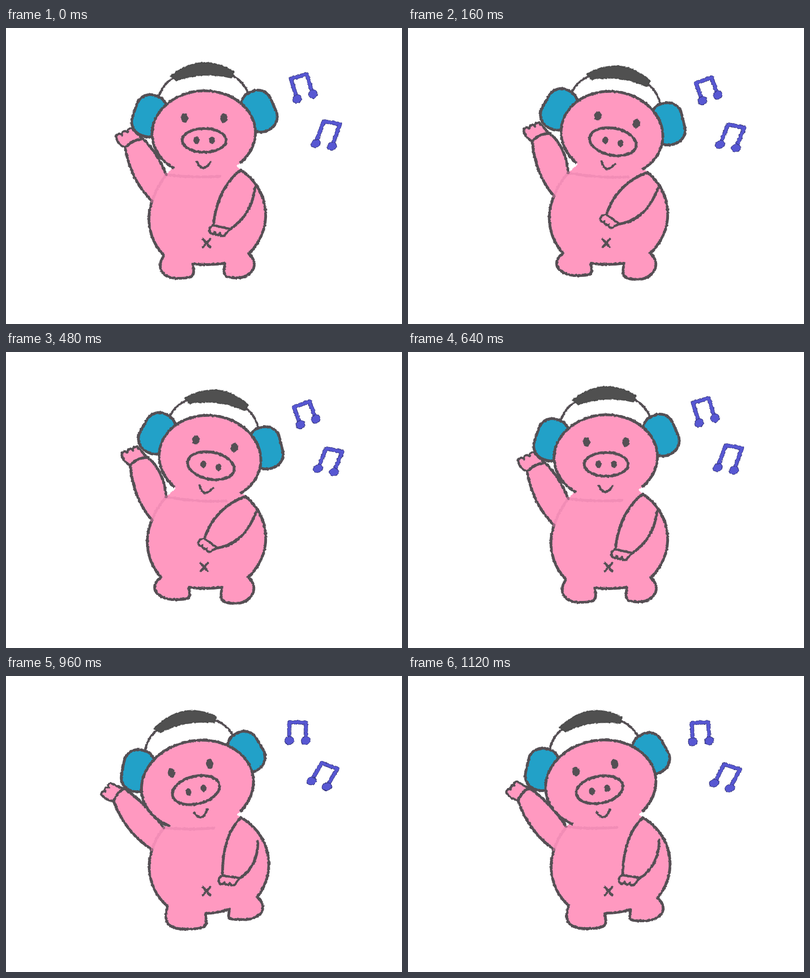
These frames come from a looping animation (865 by 648 pixels, 1.36 s). An HTML page:

```html
<!DOCTYPE html>
<html lang="en">
<head>
<meta charset="utf-8">
<title>Dancing pig</title>
<style>
  html, body { margin: 0; width: 100%; height: 100%; overflow: hidden; background: #fff; }
  svg { display: block; width: 100%; height: 100%; }
  path, ellipse, rect { stroke: #554f54; stroke-width: 6; stroke-linejoin: round; stroke-linecap: round; fill: none; }
  .skin { fill: #ff99c0; }
  .bare { stroke: none; }
  .ear { fill: #22a1c8; }
  .pad { fill: #505050; stroke: #484848; stroke-width: 2; }
  .dot { fill: #554f54; stroke: none; }
  .head { stroke-linecap: butt; stroke-dasharray: 275 85; stroke-dashoffset: -130; }
  .shade { stroke: #e582ad; opacity: .5; }
  .thin { stroke-width: 5; }
  .edge { stroke: #34347c; stroke-width: 9; }
  .note { stroke: #5757d2; stroke-width: 7; }
  .bulb { fill: #5757d2; stroke: #34347c; stroke-width: 1.2; }
</style>
</head>
<body>
<svg id="stage" viewBox="0 0 865 648">
  <filter id="crayon" filterUnits="userSpaceOnUse" x="0" y="0" width="865" height="648" color-interpolation-filters="sRGB">
    <feTurbulence type="fractalNoise" baseFrequency=".2" numOctaves="2" seed="4"/>
    <feDisplacementMap in="SourceGraphic" scale="4" xChannelSelector="R" yChannelSelector="G"/>
  </filter>
</svg>
<script>
const line = (d, style = '') => `<path class="${style}" d="${d}"/>`;
const oval = (x, y, rx, ry, style = '', tilt = 0) =>
  `<ellipse class="${style}" cx="${x}" cy="${y}" rx="${rx}" ry="${ry}" transform="rotate(${tilt} ${x} ${y})" pathLength="360"/>`;
const place = (x, y, tilt, content, skew = 0) =>
  `<g transform="translate(${x} ${y}) rotate(${tilt}) skewX(${skew})">${content}</g>`;

// Curve from a to b, pulled away from the straight line by (dx, dy).
const bend = (a, b, dx, dy) => `Q${(a[0] + b[0]) / 2 + dx},${(a[1] + b[1]) / 2 + dy} ${b}`;

function foot(a, b, sole, bulgeA, bulgeB) {
  const mid = (a[0] + b[0]) / 2, wide = (a[0] - mid) * 1.3;
  return `C${a[0] + bulgeA},${a[1] + 22} ${mid + wide},${sole} ${mid},${sole}` +
    `C${mid - wide},${sole} ${b[0] + bulgeB},${b[1] + 22} ${b}`;
}

// Three round fingers on a cuff from a to b; slant slides the fingertips along the cuff.
function paw(a, b, reach, slant) {
  const [dx, dy] = [b[0] - a[0], b[1] - a[1]], width = Math.hypot(dx, dy);
  const at = (s, out) => [a[0] + dx * s - dy / width * out, a[1] + dy * s + dx / width * out];
  const size = width * .16;
  let d = `M${a}Q${at(slant - .1, reach * .4)} ${at(slant, reach)}`;
  for (let i = 1; i <= 3; i++) d += `A${size} ${size} 0 0 0 ${at(slant + i * .31, reach)}`;
  return line(d + `Q${at(slant + 1, reach * .5)} ${b}Z`, 'skin thin');
}

function note(x, y, tilt, height, skew) {
  const stems = `M-18 0V${-height}H18V0`;
  const bulbs = [-18, 18].map(side => oval(side, 0, 10, 9, 'bulb', -20)).join('');
  return place(x, y, tilt, line(stems, 'edge') + line(stems, 'note') + bulbs, skew);
}

function headphones() {
  const ear = side => place(side * 120, 0, side * -21,
    '<rect class="ear" x="-34" y="-46" width="68" height="92" rx="31"/>');
  const wire = side => line(`M${side * 98}-40Q${side * 88}-68 ${side * 62}-82`, 'thin');
  return [-1, 1].map(side => wire(side) + ear(side)).join('') +
    line('M-70-85Q0-136 69-88L63-75Q0-93-58-74Z', 'pad');
}

function face(swing) {
  const pair = (x, y, rx, ry) => oval(-x, y, rx, ry, 'dot') + oval(x, y, rx, ry, 'dot');
  return pair(43, -49, 8, 10.5) + pair(17, 0, 6.5, 8) +
    oval(0, 0, 48 + 3.5 * swing, 26 + 3.5 * swing) + line('M-16 47Q-3 74 14 47', 'thin');
}

// The whole pose follows from one number: negative leans left, positive leans right.
function pig(lean) {
  const right = Math.max(lean, 0), left = Math.max(-lean, 0), swing = Math.abs(lean);
  const turn = Math.min(lean, 1);
  const at = (rest, perRight, perLeft) => rest + perRight * right + perLeft * left;

  const shoulder = [at(513, 10, 0), at(311, 5, -1)];
  const hip = [at(530, -1, 15), at(494, -1, -8)];
  const crotchR = [at(478, -6.5, 8), at(515, 0, -4)];
  const crotchL = [at(408, -8.5, 22), at(516, -1, 3)];
  const ankle = [at(345, -6.5, 6), at(498, -5, 5)];
  const armpit = [319, at(379, -11, 1)];
  const wristOut = [at(260, 11, -20), at(262, -14, 10)];
  const wristIn = [at(300, 10, -33), at(243, -12, 3)];
  const neck = [at(350, 0, -4), at(321, -4, 9)];
  const cuffA = [at(453, -20, 16), at(432, -23.5, 4)];
  const cuffB = [at(490, -28, 17), at(440, -11, 2)];
  const elbow = [at(544, 2, 5), at(349, 2, 10)];
  const head = [at(432, 13.5, -11), at(230.5, 1.5, 7)];
  const gearTilt = at(-2.4, 0, -6) + 10 * Math.max(turn, 0);

  const body = `M${shoulder}A122 118 0 0 1 ${hip}` + foot(hip, crotchR, at(547, 3.5, -11), 26, -2) +
    bend(crotchR, crotchL, 0, 5) + foot(crotchL, ankle, at(548, -6, 5), 2, at(-16, -13, 9)) +
    `A122 118 0 0 1 ${armpit}` + bend(armpit, wristOut, -16, 15) +
    bend(wristOut, wristIn, -3, -9) + bend(wristIn, neck, at(6, 8, 0), at(-8, -8, 0));
  const arm = `M${shoulder}${bend(shoulder, cuffA, -21, -22)}` +
    `M${cuffB}${bend(cuffB, elbow, at(20, -4, 0), at(14, 16, 0))}`;
  const chin = `M${neck}Q${head[0] - 25},${head[1] + 98} ${head[0] + 35},${head[1] + 94}` +
    `M${neck}${bend(neck, armpit, -5, -3)}`;
  const navel = `translate(${at(438, -5, 0)} 471)`;

  return place(at(433, 16, -21), at(187, 7, 0), gearTilt, headphones()) +
    paw(wristIn, wristOut, 28, .25) +
    line(`${body}L${head}Z`, 'skin bare') + line(body) +
    oval(...head, at(113, -1.5, 8), at(93, 0, 4), 'skin head', gearTilt) + line(chin, 'shade') +
    place(433 + 14.5 * lean, 246 + 3 * swing, 11 * turn, face(swing)) +
    line(arm) + paw(cuffA, cuffB, 14, -.15) +
    `<g transform="${navel}">${line('M-8-9L8 9M8-9L-8 9', 'thin')}</g>` +
    note(at(653, 7, -13), at(150, 3, -7), at(-17, -3, 14), 46 - 5 * swing, 0) +
    note(at(694, 5, -8), at(256, 3, -16), at(10, 2, 8), at(51, -4, -5), -10);
}

const stage = document.getElementById('stage');
const poses = [0, 1, 2, 1, 0, -1, -1.25, -1].map(lean => {
  const group = document.createElementNS('http://www.w3.org/2000/svg', 'g');
  group.setAttribute('filter', 'url(#crayon)');
  group.innerHTML = pig(lean);
  stage.append(group);
  return group;
});
const beat = 160, loop = 1360;

function show(time) {
  const step = Math.min(Math.floor(time % loop / beat), poses.length - 1);
  poses.forEach((pose, i) => pose.style.display = i === step ? '' : 'none');
}

const start = performance.now();
function tick() {
  show(performance.now() - start);
  requestAnimationFrame(tick);
}
tick();
</script>
</body>
</html>
```
